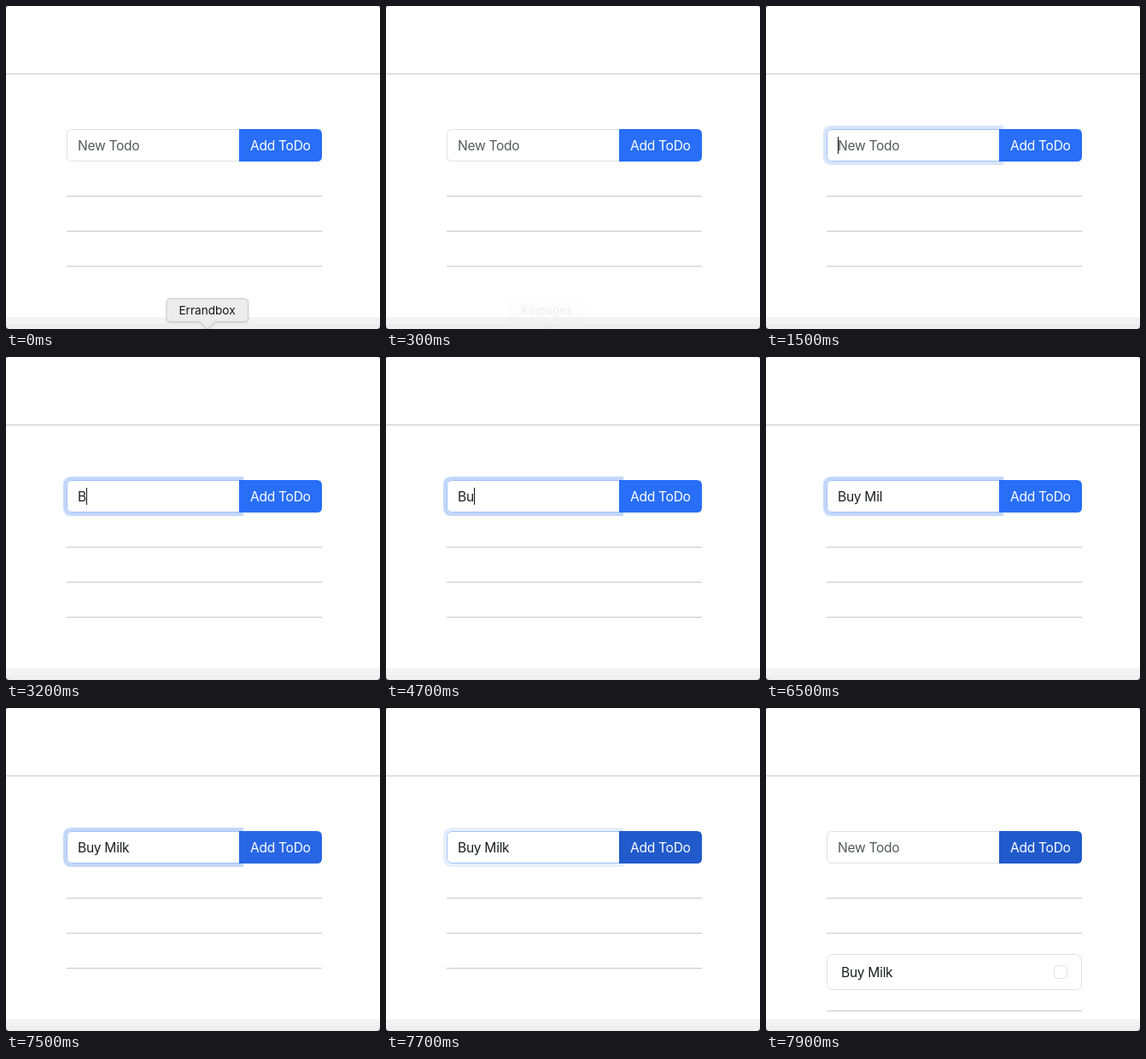
These frames come from a looping animation (438 by 378 pixels, 8 s). An HTML page:

```html
<!DOCTYPE html>
<html lang="en">
<head>
<meta charset="utf-8">
<title>Todo list</title>
<style>
  html, body { margin: 0; width: 100%; height: 100%; overflow: hidden; background: #fff; }
  svg { display: block; }
  text { font: 15.6px Inter, sans-serif; letter-spacing: -.3px; white-space: pre; fill: #1d1f21; }
  .rule { stroke: #c7c8c9; }
  .box { fill: #fff; stroke: #dee0e3; }
  .tip text { font-size: 13.6px; letter-spacing: 0; text-anchor: middle; fill: #161616; }
  .tip path { fill: #ececec; stroke: #c9c9c9; filter: drop-shadow(0 1px 1px #0002); }
</style>
</head>
<body>
<svg width="438" height="378" viewBox="0 0 438 378">
  <path d="M0 364H438V378H0z" fill="#f3f3f3"/>
  <path d="M0 372H438V378H0z" fill="#eee"/>
  <path class="rule" d="M0 79.5H438M71 222.5H370M71 263.5H370"/>
  <path class="rule" id="lastRule" d="M71 304.5H370"/>

  <g id="item">
    <rect class="box" x="71.5" y="288.5" width="298" height="41" rx="6"/>
    <text x="88" y="315">Buy Milk</text>
    <rect class="box" x="337.5" y="301.5" width="15" height="15" rx="4"/>
  </g>

  <path id="ring" d="M77 142H276V184H77Q69 184 69 176V150Q69 142 77 142z" fill="none" stroke="#c2d7fb" stroke-width="4"/>
  <path class="box" id="field" d="M273.5 144.5H77.5Q71.5 144.5 71.5 150.5V175.5Q71.5 181.5 77.5 181.5H273.5z"/>
  <text id="entry" x="84" y="169"></text>
  <path id="caret" d="M.5 153V173" stroke="#111"/>
  <path id="button" d="M273 144H364Q370 144 370 150V176Q370 182 364 182H273z"/>
  <text x="286" y="169" style="fill:#fff">Add ToDo</text>

  <g class="tip" id="tipA">
    <path d="M193 342.5H278.5Q283.5 342.5 283.5 347.5V364.5Q283.5 369.5 278.5 369.5H245L236 378L227 369.5H193Q188 369.5 188 364.5V347.5Q188 342.5 193 342.5z"/>
    <text x="235.5" y="361">Errandbox</text>
  </g>
  <g class="tip" id="tipB">
    <path d="M149 342.5H227Q232 342.5 232 347.5V364.5Q232 369.5 227 369.5H197L188 378L179 369.5H149Q144 369.5 144 364.5V347.5Q144 342.5 149 342.5z"/>
    <text x="188" y="361">Kinpages</text>
  </g>

  <!-- rounded window corners -->
  <path d="M0 0H2Q0 0 0 2zM438 0V2Q438 0 436 0zM0 378V374Q0 378 4 378zM438 378H434Q438 378 438 374z" fill="#333"/>
</svg>
<script>
const LOOP = 8000, STEP = 100, FOCUS = 1500, SUBMIT = 7800;
const el = id => document.getElementById(id);
const set = (id, attrs) => { for (const k in attrs) el(id).setAttribute(k, attrs[k]); };
const show = (id, opacity) => set(id, { opacity: Number(opacity) });

// Latest value of a [time, value] list at time t
const at = (list, t) => list.filter(([start]) => start <= t).pop();

const typing = [
  [0, ""], [1400, ""], [3200, "B"], [3700, "By"], [4300, "B"], [4700, "Bu"],
  [5000, "Buy"], [5200, "Buy "], [5500, "Buy M"], [5800, "Buy Mi"],
  [6000, "Buy Mil"], [6700, "Buy Milk"], [SUBMIT, ""]
];
const ringFade = [[0, 0], [FOCUS, .65], [1600, 1], [7700, .4], [SUBMIT, 0]];
const tipFade = [[0, 0], [100, 1], [200, .4], [300, .07], [FOCUS, 0]];
const buttonFill = [[0, "#286ef7"], [7500, "#2866e5"], [7600, "#205acb"]];

function draw(t) {
  const [typedAt, text] = at(typing, t);
  const ring = at(ringFade, t)[1];

  el("entry").textContent = text || "New Todo";
  el("entry").style.fill = text ? "" : "#56595c";
  const end = text ? el("entry").getComputedTextLength() : 0;
  set("caret", { transform: `translate(${Math.round(84 + end)})` });
  show("caret", t >= FOCUS && t < 7500 && (t - typedAt) % 1000 < 500);

  show("ring", ring);
  el("field").style.stroke = ring ? "#9fc1f5" : "";
  set("button", { fill: at(buttonFill, t)[1] });

  show("tipA", t < 100);
  show("tipB", at(tipFade, t)[1]);

  show("item", t >= SUBMIT);
  set("lastRule", { transform: `translate(0 ${t >= SUBMIT ? 50 : 0})` });
}

const began = performance.now();
function tick() {
  const t = (performance.now() - began) % LOOP;
  draw(Math.floor(t / STEP) * STEP);
  requestAnimationFrame(tick);
}
tick();
</script>
</body>
</html>
```
